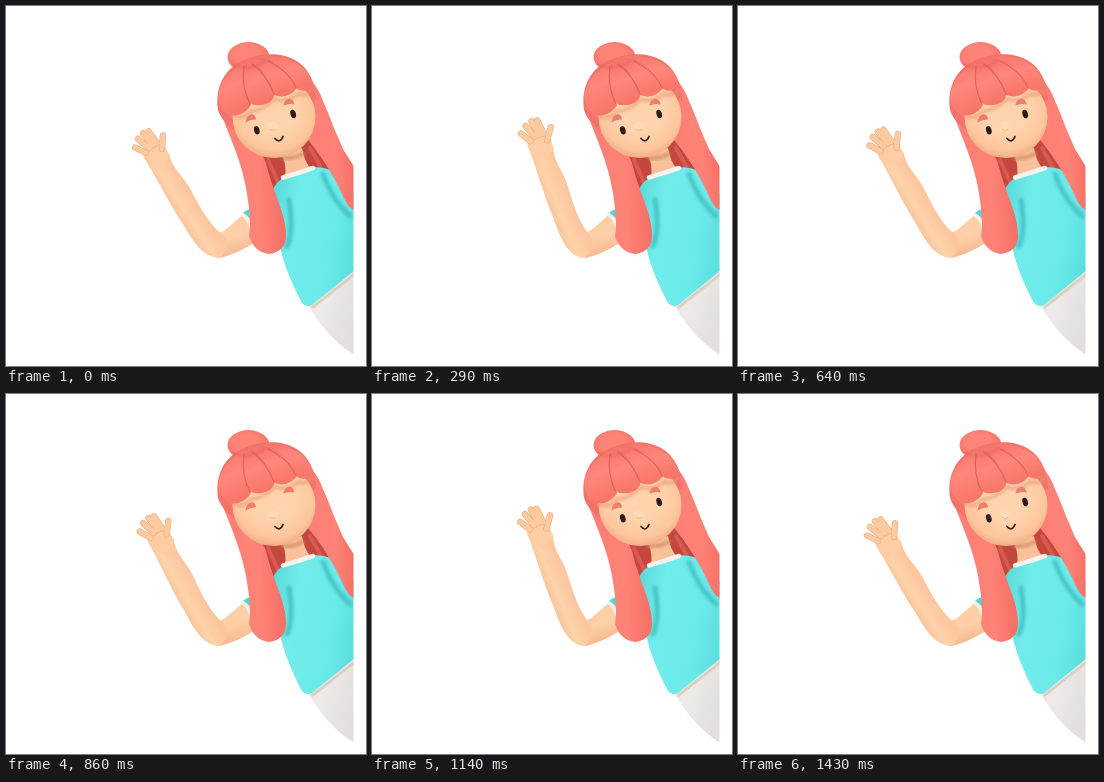
An HTML page without scripts for the animation above (1500 ms loop, 360 px wide and 360 px high).

```html
<!DOCTYPE html>
<html lang="en">
<head>
<meta charset="utf-8">
<title>Waving girl</title>
<style>
  html, body { margin: 0; width: 100%; height: 100%; overflow: hidden; background: #fff; }
  svg { display: block; width: 360px; height: 360px; }
  .line { fill: none; stroke-linecap: round; }
  .shade { fill: none; stroke-linecap: round; filter: url(#soft); }
</style>
</head>
<body>
<svg viewBox="0 0 360 360">
  <defs>
    <clipPath id="stage"><path d="M0 0H347.500V348H0Z"/></clipPath>
    <radialGradient id="face" cx=".5" cy=".42" r=".6">
      <stop offset=".45" stop-color="#ffd3ac"/><stop offset=".8" stop-color="#fdc69c"/><stop offset="1" stop-color="#efa984"/>
    </radialGradient>
    <radialGradient id="bun" cx=".45" cy=".4" r=".7">
      <stop offset=".4" stop-color="#ff8478"/><stop offset="1" stop-color="#f06a61"/>
    </radialGradient>
    <linearGradient id="lobe" x1="0" y1="0" x2=".3" y2="1">
      <stop offset="0" stop-color="#f7756b"/><stop offset=".5" stop-color="#ff877b"/><stop offset="1" stop-color="#f8776c"/>
    </linearGradient>
    <linearGradient id="tress" x1="0" y1=".5" x2="1" y2=".4">
      <stop offset="0" stop-color="#fd7e74"/><stop offset=".6" stop-color="#ff8277"/><stop offset="1" stop-color="#f26c63"/>
    </linearGradient>
    <linearGradient id="shirt" x1="0" y1=".3" x2="1" y2=".6">
      <stop offset="0" stop-color="#5ddcdc"/><stop offset=".25" stop-color="#70ecea"/><stop offset=".7" stop-color="#6ceaea"/><stop offset="1" stop-color="#5bdede"/>
    </linearGradient>
    <linearGradient id="skirt" x1="0" y1="0" x2="1" y2=".6">
      <stop offset="0" stop-color="#e2dbd6"/><stop offset=".35" stop-color="#eeebea"/><stop offset="1" stop-color="#e3dddd"/>
    </linearGradient>
    <linearGradient id="forearm" gradientUnits="userSpaceOnUse" x1="-44" y1="-31" x2="-24" y2="-44">
      <stop offset="0" stop-color="#f8c097"/><stop offset=".45" stop-color="#ffd3ab"/><stop offset="1" stop-color="#fcc79e"/>
    </linearGradient>
    <linearGradient id="upperArm" x1=".3" y1="0" x2=".6" y2="1">
      <stop offset="0" stop-color="#fdca9f"/><stop offset=".5" stop-color="#ffd1a8"/><stop offset="1" stop-color="#f2b58b"/>
    </linearGradient>
    <filter id="soft" x="-50%" y="-50%" width="200%" height="200%"><feGaussianBlur stdDeviation="1.800"/></filter>
    <path id="fingers" class="line" d="M-71-91L-82-96.500M-68-96L-79-105M-64-99L-74-110.500M-60-101L-68.500-112.500M-55-95L-54-108.500"/>
    <ellipse id="eye" rx="2.700" ry="4.300" transform="rotate(-16)">
      <animate attributeName="ry" values="4.3;2;0;1.500;3;4.3" keyTimes="0;.5238;.5714;.619;.6667;.7143" calcMode="discrete" dur="1.5s" begin="-.005s" repeatCount="indefinite"/>
    </ellipse>
  </defs>

  <g clip-path="url(#stage)">
    <!-- hair behind the neck -->
    <path d="M240 130L306 110L332 172L268 190Z" fill="#c4473e"/>
    <path class="line" d="M262 154L273 178M304 142L317 165" stroke="#d95a50" stroke-width="4"/>
    <path d="M275 146L296 142Q298 155 305 163Q292 176 279 172Q281 158 275 146Z" fill="#f8c19a"/>
    <path class="shade" d="M278 152Q288 153 296 148" stroke="#dc976f" stroke-width="4"/>

    <!-- clothes -->
    <path d="M303 298L350 260V350Q323 334 304 302Z" fill="url(#skirt)"/>
    <path class="line" d="M307 301L350 267" stroke="#dbd1c2" stroke-width="3"/>
    <path d="M267 183Q271 175 279 171Q294 167 307 161Q322 161 332 168L350 190V263L306 299Q301 302 296 297Q278 263 274 239Z" fill="url(#shirt)"/>
    <path class="shade" d="M283 194Q288 225 281 240M317 168Q327 195 344 210" stroke="#36b4b6" stroke-width="5" opacity=".65"/>
    <path class="line" d="M277 171.500Q291 167.500 307 162" stroke="#f8f2ee" stroke-width="4.500"/>

    <!-- raised arm -->
    <path d="M211 227Q215 227 219 224L238 208L251 216V235Q231 248 214 252Q198 250 198 239Z" fill="url(#upperArm)"/>
    <path d="M237 207Q241 203 246 203L250 219Q244 211 237 207Z" fill="#58d2d2"/>
    <path class="line" d="M237 209Q242 212 245 221" stroke="#f5efea" stroke-width="3.500"/>
    <g transform="translate(211 238)">
      <g>
        <animateTransform attributeName="transform" type="rotate" calcMode="discrete" dur="1.5s" begin="-.005s" repeatCount="indefinite"
          values="0;1.2;4.3;8.3;11;11.4;10.3;7.6;4.2;1.5;0;.8;2.8;6;9.2;11.2;10.700;8;4.500;1.300;0"/>
        <path d="M-73-86C-62-69-47-39-34-20C-24-3-14 14 3 14Q17 0 4-11C-6-18-17-36-26-54C-34-69-45-75-48-91Z" fill="url(#forearm)"/>
        <path d="M-73-86Q-76-92-71-97Q-64-104-57-101Q-50-97-48-88Q-50-77-59-76Q-68-78-73-86Z" fill="#fecda4"/>
        <use href="#fingers" stroke="#eaae84" stroke-width="6.400"/>
        <use href="#fingers" stroke="#fdcaa0" stroke-width="5.200"/>
      </g>
    </g>

    <!-- long hair -->
    <path d="M300 68Q313 82 317 95Q322 106 328 122L337 143L350 164V205Q342 203 336 188Q323 159 299 130Z" fill="url(#tress)"/>
    <path d="M212 98C216 114 235 151 240 182C244 205 245 217 243 230Q248 246 263 248Q280 246 280 229C280 207 267 187 260 157L240 112Z" fill="url(#tress)"/>

    <!-- head -->
    <ellipse cx="242.500" cy="51" rx="21" ry="15" fill="url(#bun)"/>
    <path d="M212 104C209 83 217 65 234 56C250 47 274 45 289 54C303 62 309 76 310 94L290 112L235 128Q217 119 212 104Z" fill="#f3736a"/>
    <ellipse cx="268" cy="111" rx="41.500" ry="41" fill="url(#face)"/>
    <path class="shade" d="M225 109Q237 115 245 105Q257 105 269 93Q280 97 292 88Q300 91 307 84" stroke="#e39a72" stroke-width="3" opacity=".7"/>
    <g fill="url(#lobe)">
      <path d="M251 51C274 54 288 69 290 82Q297 88 308 81C304 59 279 47 251 51Z"/>
      <path d="M236 58C214 70 208 90 216 103C223 113 238 111 245 99Q236 78 240 58Z"/>
      <path d="M242 54C259 60 263 79 268 89Q282 94 291 82C288 67 272 52 242 54Z"/>
      <path d="M239 57C233 77 238 96 248 99C260 101 270 94 268 87C262 71 253 60 239 57Z"/>
    </g>
    <path class="line" d="M238 60Q235 81 244 98M246 58Q261 69 268 88M262 55Q284 66 290 82" stroke="#db5d54" stroke-width="1.300" opacity=".8"/>
    <path class="shade" d="M226 59Q241 66 260 55" stroke="#dc594f" stroke-width="2" opacity=".6"/>

    <!-- features -->
    <g fill="#f07b6f">
      <path d="M239.500 116.500Q240 109 246 108Q250 109 250 113.500Q245 113 239.500 116.500Z"/>
      <path d="M277.500 99.500Q278 93 284 92.500Q288 94 288.500 98.500Q283 97 277.500 99.500Z"/>
    </g>
    <circle cx="267" cy="120" r="5" fill="#ffdab6"/>
    <path class="line" d="M264 123.500Q267 126 270 123.500" stroke="#f5b890" stroke-width="1"/>
    <g fill="#2b1b1b">
      <use href="#eye" x="250.800" y="124.300"/>
      <use href="#eye" x="287.200" y="108"/>
    </g>
    <path class="line" d="M269 132.500Q274 138 277 130.500" stroke="#3a1d1b" stroke-width="1.800"/>
  </g>
</svg>
</body>
</html>
```
